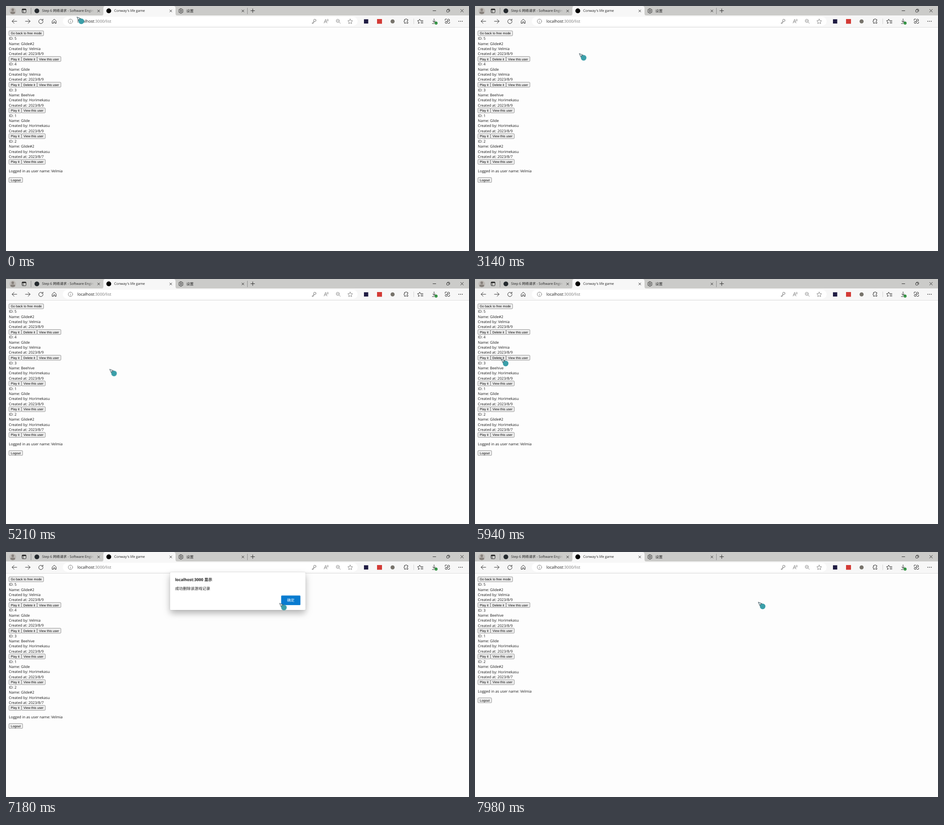
Animation, 1027 px wide and 545 px high, one loop 8000 ms. Source, as an HTML page:

```html
<!DOCTYPE html>
<html lang="en">
<head>
<meta charset="utf-8">
<title>Saved games</title>
<style>
html, body { margin: 0; width: 100%; height: 100%; overflow: hidden; background: #fdfdfd; }
svg { display: block; width: 1027px; height: 545px; }
text { font-family: "Open Sans", "Noto Sans CJK SC", "Noto Sans CJK", sans-serif; font-size: 8.12px;
  fill: #161616; text-rendering: geometricPrecision; white-space: pre; }
.tab { font-size: 7.65px; fill: #222; }
.url { font-size: 8.88px; }
.btn text { font-family: "Liberation Sans", Arial, sans-serif; font-size: 7.17px; fill: #000; }
.btn rect { fill: #efefef; stroke: #777; stroke-width: .8; }
.icon { fill: none; stroke: #2b2b2b; stroke-width: 1; stroke-linecap: round; stroke-linejoin: round; }
.soft { stroke: #777; stroke-width: .9; }

.cursor, .dialog, .removed, .after, .target rect { animation: 8s linear infinite; }
.cursor { animation-name: cursor; animation-timing-function: ease-in-out; }
.dialog { animation-name: dialog; transform-origin: 514px 87px; }
.removed { animation-name: removed; }
.after { animation-name: after; }
.target rect { animation-name: hover; animation-timing-function: step-end; }

@keyframes cursor {
  0%, 31% { transform: translate(157px, 24px); }
  49%, 60.5% { transform: translate(329px, 213px); }
  71.5%, 82% { transform: translate(58px, 178px); }
  91%, 100% { transform: translate(628px, 111px); }
}
@keyframes dialog {
  0%, 77.4% { opacity: 0; transform: translateY(-14px); }
  79%, 93.75% { opacity: 1; transform: none; }
  94.25% { opacity: .82; transform: translateY(-5px) scale(1.004, 1); }
  95.6%, 100% { opacity: 0; transform: translateY(-14px) scale(1.01, 1); }
}
@keyframes removed {
  0%, 93.75% { opacity: 1; }
  93.751%, 100% { opacity: 0; }
}
@keyframes after {
  0%, 93.75% { transform: none; }
  93.751%, 100% { transform: translateY(-57.2px); }
}
@keyframes hover {
  0% { fill: #efefef; stroke: #777; }
  71% { fill: #e8e8e8; stroke: #666; }
  77.5% { fill: #e1e1e1; stroke: #444; }
  84% { fill: #efefef; stroke: #777; }
}
</style>
</head>
<body>
<svg viewBox="0 0 1027 545">
  <defs>
    <linearGradient id="fade" gradientUnits="userSpaceOnUse" x1="180" x2="196" y1="0" y2="0">
      <stop offset="0" stop-color="#cbcbc9" stop-opacity="0"/>
      <stop offset="1" stop-color="#cbcbc9"/>
    </linearGradient>
    <filter id="shadow" x="-20%" y="-40%" width="140%" height="200%">
      <feDropShadow dx="0" dy="7" stdDeviation="8" flood-color="#000" flood-opacity=".26"/>
      <feDropShadow dx="0" dy="0" stdDeviation="1" flood-color="#000" flood-opacity=".2"/>
    </filter>
    <path id="close" d="M-2.3-2.3 2.3 2.3M2.3-2.3-2.3 2.3"/>
    <path id="star" d="M0-5.2 1.6-1.8 5.3-1.3 2.6 1.3 3.3 5 0 3.2-3.3 5-2.6 1.3-5.3-1.3-1.6-1.8Z"/>
  </defs>

  <rect width="1027" height="545" fill="#fdfdfd"/>

  <!-- tab strip -->
  <rect width="1027" height="22" fill="#cbcbc9"/>
  <path d="M211 21.5q5 0 5-5V5q0-5 5-5H371q5 0 5 5V16.500q0 5 5 5Z" fill="#f7f7f7"/>
  <path d="M55.500 4V18M535.500 4V18" stroke="#8d8d8d"/>
  <circle cx="15" cy="11" r="7.500" fill="#bdb9b5"/>
  <circle cx="15" cy="8.500" r="2.900" fill="#87817c"/>
  <path d="M9.800 16.300V15q0-2.500 2.500-2.500h5.400q2.500 0 2.500 2.500v1.300q-5.200 3.400-10.400 0Z" fill="#87817c"/>
  <g class="icon">
    <rect x="35.500" y="6.500" width="9" height="8.500" rx="1.500"/>
    <path d="M36 8H44" stroke-width="2"/><path d="M38 9V14.500"/>
    <use href="#close" x="205.500" y="11"/><use href="#close" x="365.500" y="11"/><use href="#close" x="525.500" y="11"/>
    <path d="M543 10.500h8.500M547.250 6.250v8.500M947 10.500h6.500"/>
    <rect x="977.500" y="8.500" width="5" height="5" rx="1"/>
    <path d="M979.500 7h3q1.700 0 1.700 1.700v3M1008.500 7.500l6 6M1014.500 7.500l-6 6"/>
    <circle cx="388" cy="11" r="1.700"/>
    <path d="M386.800 6h2.400l.5 1.600 1.700-.5 1.400 2-1.200 1.900 1.200 1.900-1.400 2-1.700-.5-.5 1.600h-2.400l-.5-1.600-1.700.5-1.400-2 1.200-1.900-1.200-1.900 1.400-2 1.700.5Z"/>
  </g>
  <circle cx="68.500" cy="10.700" r="5.300" fill="#24292e"/>
  <circle cx="228" cy="10.700" r="5.400" fill="#000"/>
  <text class="tab" x="80" y="13.300">Step 6 网络请求 - Software Engin</text>
  <rect x="180" y="2" width="16" height="17" fill="url(#fade)"/>
  <rect x="195.500" y="2" width="6" height="17" fill="#cbcbc9"/>
  <text class="tab" x="240" y="13.300">Conway's life game</text>
  <text class="tab" x="400" y="13.700" style="font-size:8.1px">设置</text>

  <!-- toolbar -->
  <rect y="21" width="1027" height="26.500" fill="#f7f7f7"/>
  <path d="M0 47.500H1027" stroke="#dedede"/>
  <rect x="126" y="24" width="654" height="20" rx="10" fill="#fff"/>
  <g class="icon">
    <path d="M24 34H13.500M18 29.500 13.500 34l4.500 4.500M43 34h10.500M49 29.500l4.500 4.500-4.500 4.500"/>
    <path d="M81.300 31.500a4.800 4.800 0 1 0 .9 2.500M82 29v2.900h-2.900"/>
    <path d="M102.700 33.300 107 29.300l4.300 4v5.200h-2.800v-3.300h-3v3.300h-2.800Z"/>
  </g>
  <g class="icon soft">
    <circle cx="143" cy="34" r="4.900"/><path d="M143 33.700v2.700M143 31.600v.1"/>
    <circle cx="685" cy="32" r="2.700"/><path d="M683 34l-4 4v1h2.200v-1.500h1.500V36l1.200-1.200M685.800 31.200v.1"/>
    <path d="M705.500 38l3.200-8.300L712 38M706.700 35.200h4M712 30.200q1.300 1.300 0 2.800M713.800 29q2.200 2.400 0 5"/>
    <circle cx="736" cy="33" r="3.500"/><path d="M738.700 35.700l3 3M734.500 33h3"/>
    <use href="#star" x="763.500" y="34.200"/>
  </g>
  <text class="url" x="158.500" y="37.200">localhost<tspan fill="#777">:3000/list</tspan></text>
  <rect x="794" y="29.500" width="9.500" height="9.500" fill="#201c43"/>
  <rect x="823" y="29" width="11" height="10.500" fill="#d33a35"/>
  <circle cx="857.500" cy="34.200" r="4.500" fill="#77736b"/>
  <path d="M904.500 28V40" stroke="#d0d0d0"/>
  <g class="icon">
    <path d="M884 30h2q0-1.500 1.500-1.500T889 30h2.300v2.500q-1.700 0-1.700 1.600t1.700 1.600v2.800H889q0-1.500-1.500-1.500T886 38.500h-2v-2.800q-1.300 0-1.300-1.600t1.300-1.600Z"/>
    <path d="M921 32.500l-1.900-.2-1.500-3.300-1.600 3.300-3.200.5 2.400 2.400-.6 3.600 3-1.700M921 32.500h4M920.500 35.300h4.500M920.500 38h4.500"/>
    <path d="M949.500 28.500v7.500M946.300 33l3.200 3.200 3.200-3.200M945.500 39h4.500"/>
    <circle cx="981.500" cy="31.500" r="2.300"/><circle cx="976.500" cy="36.500" r="2.300"/>
    <path d="M974 32v-2q0-1 1-1h2.500M984 35.500v2q0 1-1 1h-2.500M978 34.800l2-1.800"/>
  </g>
  <circle cx="954" cy="38" r="3.200" fill="#148226"/>
  <path d="M952.500 38l1.100 1.100 1.900-2" fill="none" stroke="#fff" stroke-width=".8"/>
  <g fill="#2b2b2b"><circle cx="1004.500" cy="34" r=".9"/><circle cx="1008.300" cy="34" r=".9"/><circle cx="1012" cy="34" r=".9"/></g>

  <g id="page"></g>

  <g class="dialog">
    <rect x="364" y="45" width="300" height="84" rx="2.500" fill="#fff" filter="url(#shadow)"/>
    <text x="375" y="65" font-weight="700" style="font-size:8.8px">localhost:3000 显示</text>
    <text x="375" y="84.200" style="font-size:8.67px">成功删除该游戏记录</text>
    <rect x="610.300" y="96.800" width="42.700" height="21.200" rx="1.500" fill="#087bd0"/>
    <text x="631.600" y="110.300" text-anchor="middle" style="font-size:8.3px;fill:#fff">确定</text>
  </g>

  <g class="cursor">
    <circle cx="10" cy="10" r="6.200" fill="#3b9fa9"/>
    <path d="M.3.500 8.500 3.800 5.300 5 3.700 8.300Z" fill="#d9f0f2" stroke="#2b3a46" stroke-width=".9" stroke-linejoin="round"/>
  </g>
</svg>
<script>
const PITCH = 57.2, LINE = 11.3;
const ME = "Velmia", OTHER = "Horimekasu";
const games = [
  [5, "Glide#2", ME, "2023/8/9"],
  [4, "Glide", ME, "2023/8/9"],
  [3, "Beehive", OTHER, "2023/8/9"],
  [1, "Glide", OTHER, "2023/8/9"],
  [2, "Glide#2", OTHER, "2023/8/7"],
];

const label = (y, text) => `<text x="6.3" y="${y}">${text}</text>`;

const button = (x, y, width, text, extra = "") =>
  `<g class="btn ${extra}"><rect x="${x}" y="${y}" width="${width}" height="11" rx="1.6"/>` +
  `<text x="${x + width / 2}" y="${y + 8.1}" text-anchor="middle">${text}</text></g>`;

function entry([id, name, author, date], index) {
  const top = 75.2 + index * PITCH;
  const lines = [`ID: ${id}`, `Name: ${name}`, `Created by: ${author}`, `Created at: ${date}`];
  const y = top + 37.2;
  const own = author === ME;
  return lines.map((text, i) => label(top + i * LINE, text)).join("") +
    button(6.5, y, 27.7, "Play it") +
    (own ? button(34.6, y, 34.2, "Delete it", id === 4 ? "target" : "") : "") +
    button(own ? 69.2 : 34.6, y, 52.6, "View this user");
}

const [first, removed, ...rest] = games.map(entry);
document.getElementById("page").innerHTML =
  button(6.5, 55.2, 76.9, "Go back to free mode") + first +
  `<g class="removed">${removed}</g>` +
  `<g class="after">${rest.join("")}${label(369.9, "Logged in as user name: " + ME)}` +
  `${button(6.5, 381.6, 30.3, "Logout")}</g>`;
</script>
</body>
</html>
```
